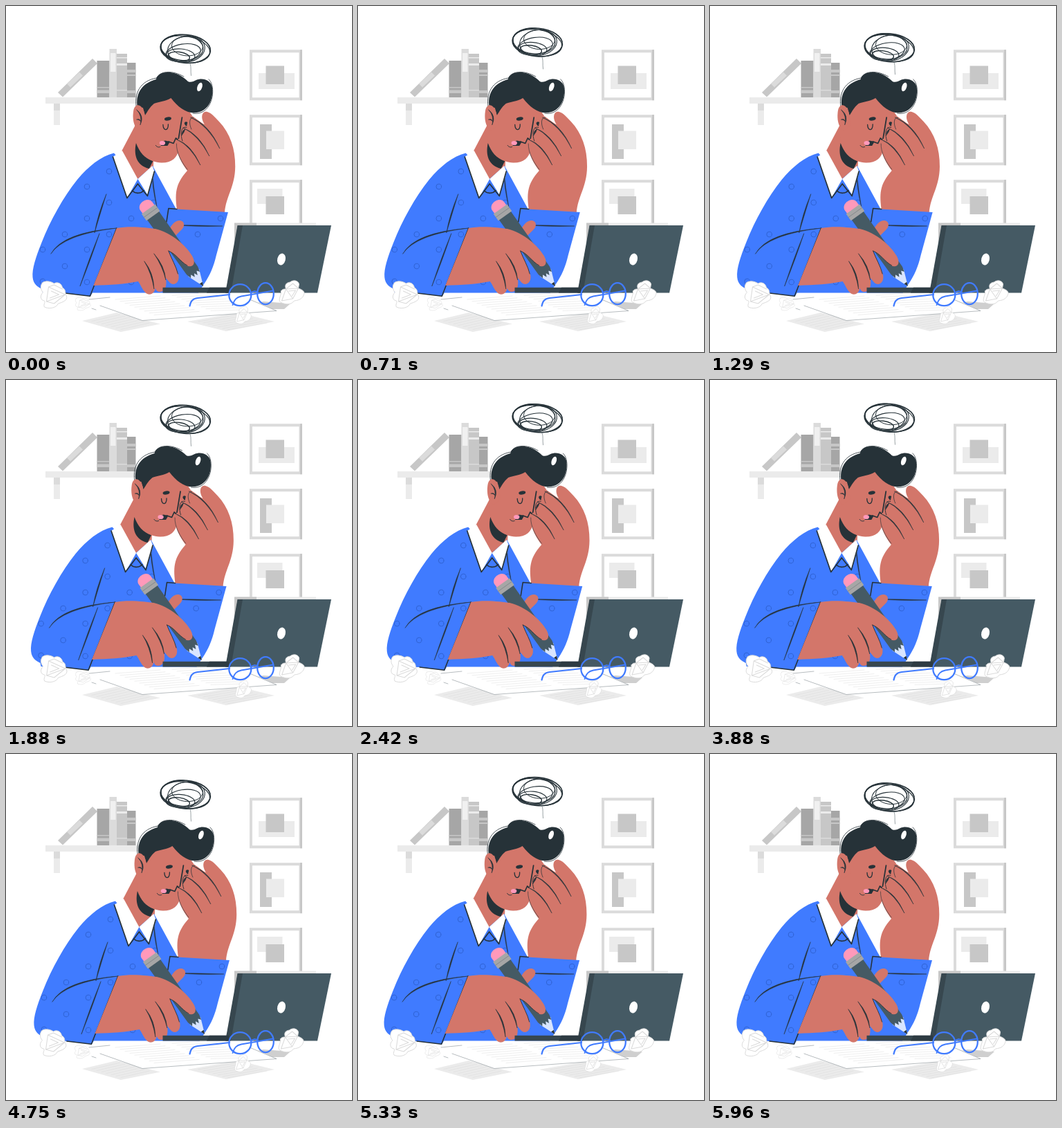
Recreate the animation shown at these times as an HTML page with a canvas. Size 500 by 500 pixels, loop 6 s.

```html
<!DOCTYPE html>
<html lang="en">
<head>
<meta charset="utf-8">
<title>Tired at the desk</title>
<style>
html, body { margin: 0; width: 100%; height: 100%; overflow: hidden; background: #fff; }
canvas { display: block; width: 100vw; height: 100vh; }
</style>
</head>
<body>
<canvas id="stage"></canvas>
<script>
const SIZE = 500, LOOP = 6000, FRAMES = 144, STEP = LOOP / FRAMES;
const INK = '#263238', BLUE = '#407bff', SKIN = '#d3766a', SLATE = '#455a64', DARK = '#37474f';
const G1 = '#ebebeb', G2 = '#dbdbdb', G3 = '#c7c7c7', G4 = '#a6a6a6';

const canvas = document.getElementById('stage');
const ctx = canvas.getContext('2d');
const ratio = window.devicePixelRatio || 1;
canvas.width = canvas.height = SIZE * ratio;

function fill(d, color) {
  ctx.fillStyle = color;
  ctx.fill(new Path2D(d));
}
function line(d, color = INK, w = 1) {
  ctx.strokeStyle = color;
  ctx.lineWidth = w;
  ctx.stroke(new Path2D(d));
}
function rect(x1, y1, x2, y2, color) {
  ctx.fillStyle = color;
  ctx.fillRect(x1, y1, x2 - x1, y2 - y1);
}
function oval(x, y, rx, ry, deg, color, w) {
  ctx.beginPath();
  ctx.ellipse(x, y, rx, ry, deg * Math.PI / 180, 0, 7);
  if (w) {
    ctx.strokeStyle = color;
    ctx.lineWidth = w;
    ctx.stroke();
  } else {
    ctx.fillStyle = color;
    ctx.fill();
  }
}
// Curved crease, thick in the middle and pointed at both ends.
function crease(x1, y1, cx, cy, x2, y2, w = 2) {
  const len = Math.hypot(x2 - x1, y2 - y1);
  const nx = (y2 - y1) / len * w, ny = (x1 - x2) / len * w;
  const d = `M${x1} ${y1}Q${cx + nx} ${cy + ny} ${x2} ${y2}Q${cx - nx} ${cy - ny} ${x1} ${y1}Z`;
  fill(d, INK);
  line(d, INK, 0.5);
}
function at(x, y, draw) {
  ctx.save();
  ctx.translate(x, y);
  draw();
  ctx.restore();
}

function drawShelf() {
  rect(57, 132, 215, 141, G1);
  rect(69, 141, 78, 172, G1);
  rect(69, 141, 78, 151, G2);
  fill('M75 125L125 76L132 83L82 131.5Z', G3);
  fill('M88 112.5L106 95.5L111 100.5L93 117.5Z', G2);
  rect(131.5, 79, 149.5, 132, G4);
  rect(131.5, 117, 149.5, 118.5, G3);
  rect(131.5, 121.5, 149.5, 126, G3);
  rect(149.5, 62, 160, 132, G2);
  rect(151, 68, 158.5, 95, '#f0f0f0');
  rect(160, 69, 175, 132, G3);
  rect(160, 74, 175, 75.5, G1);
  rect(160, 83, 175, 86, G1);
  rect(160, 121, 175, 122.5, G2);
  rect(175, 82, 187.5, 132, G4);
  rect(175, 92, 187.5, 96, G3);
  rect(175, 99, 187.5, 101, G3);
  rect(175, 122, 187.5, 126, G3);
}

function drawFrame(y) {
  rect(352, y, 428, y + 73, G2);
  rect(425, y, 428, y + 73, G3);
  rect(356, y + 4, 423.5, y + 69, '#fff');
}
function drawWall() {
  [63.3, 157.2, 251.2].forEach(drawFrame);
  rect(365, 97, 417, 120, G1);
  rect(375.5, 86.5, 402, 113, G3);
  rect(367, 171, 384, 221, G3);
  rect(376, 180.5, 402, 207, G1);
  rect(363, 264, 399.5, 286, G1);
  rect(375.5, 275, 402, 301, G3);
  rect(330, 313.5, 448, 330, G1);
  rect(330, 313.5, 362, 345, G3);
}

function drawScribble() {
  oval(259.3, 62.5, 36.2, 20.3, 5, INK, 1.7);
  oval(259, 63.2, 36, 19, 9, INK, 1.2);
  oval(254.5, 60.5, 30.5, 18.5, 5, INK, 1.2);
  oval(260.5, 63, 27, 18.5, -8, INK, 1.1);
  oval(262, 58.5, 22.5, 14, 2, INK, 1);
  oval(256, 68, 25.5, 12.5, -9, INK, 1.1);
  oval(252.5, 72, 20.5, 9.5, 5, INK, 1.2);
  oval(250, 73.5, 15.5, 6.5, 8, INK, 1.4);
  line('M235 76C246 84 264 79 266 84C268 89 266.5 94 267.5 101', '#58656b', 0.6);
}

function drawSheets() {
  fill('M110 455L160 443L223 459.5L166 471Z', G1);
  fill('M262 456L335 443L388 456L318 470Z', G1);
  for (let i = 0; i < 7; i++) {
    const x = i * 7;
    line(`M${124 + x} ${455.5 + i * 2}L${165 + x} ${446 + i * 2}`, G2, 0.5);
    line(`M${278 + x} ${456 + i * 2}L${335 + x} ${446 + i * 2}`, G2, 0.5);
  }
  fill('M345 432L372 427L411 430L402 438L370 438Z', '#cfcfcf');
  fill('M112 424L197 454.5L391 440.5L334 414L150 414Z', '#fff');
  line('M120 424L150 421M124 437L130 439M136 433L197 454.5L391 440.5L352 424', '#6f797e', 0.5);
  for (let i = 0; i < 9; i++) {
    const x = 158 + i * 7, y = 424 + i * 2.8;
    line(`M${x} ${y}L${x + 65} ${y - 5}`, '#e3e3e3', 0.6);
    line(`M${x + 82} ${y - 6}L${x + 142 - i} ${y - 10 + i * 0.3}`, '#e3e3e3', 0.6);
  }
}

const SHIRT = 'M156 212.5C137 217 119 232 103 251C83 276 64 310 51.5 342C43 363 37.5 380 38.6 392'
  + 'C39.5 402 46 406 52 409L53 414L85 415L122 419.5L125 414.5L278 414.5L286 402'
  + 'C295 389 300 377 304 360L321 298L246 293.5L212 231L190 250Z';
const DOTS = [[149, 239], [117, 261], [149, 284], [213, 284], [117, 307], [181, 307], [310, 307],
  [85, 330], [149, 330], [277, 330], [53, 352], [117, 352], [85, 376], [53, 398], [117, 399], [181, 399]];

function drawShirt() {
  fill(SHIRT, BLUE);
  ctx.save();
  ctx.clip(new Path2D(SHIRT));
  DOTS.forEach(([x, y]) => oval(x, y, 3.8, 3.8, 0, '#2f62d2', 1));
  ctx.restore();
  crease(145, 272, 134, 302, 128, 328, 1.6);
  crease(211, 236, 212, 262, 218, 290, 1);
  crease(65, 358, 83, 328.5, 160, 321, 1.6);
  crease(135, 329, 122, 364, 107, 405, 1.4);
  line('M160 321L121.5 419.3L86 415', INK, 1.6);
  line('M232 312L235 292.5L247 293.5', INK, 1.6);
  crease(243, 316.5, 280, 318, 313, 318, 1.4);
}

function drawHead() {
  fill('M187 172L167 210L190 252L213 232L214 205Z', SKIN);
  fill('M188 198C184 217 190 231 207 235L212.5 224C200 220 193 211 188 198Z', INK);
  fill('M190 145C186 160 186 180 188 194C192 214 207 226 225 226.5C240 226.5 248 219 250 206'
    + 'L270 160L250 130L212 134Z', SKIN);
  // hair
  fill('M201 158L198 147L190 146C187 128 195 112 217 106C218 98 229 95 238 96C249 97 258 104 263 109'
    + 'C267 111 271 109 275 107C284 103 296 107 298 117C300 133 294 148 280 153'
    + 'C264 158 250 148 238.5 133C230 138 222 138 214 141C207 147 205 152 201 158Z', INK);
  line('M189 150C184 126 194 108 218 104C222 94 240 92 257 102', INK, 0.8);
  line('M293 106C302 113 301 141 287 151C282 155 276 156 270 155', INK, 0.8);
  oval(280, 117, 3.4, 6.6, 20, '#fff');
  // ear
  fill('M200 154C196 141 187 140 184.5 150C182 163 185 177 193 180L203 172Z', SKIN);
  crease(189, 150, 199, 159, 194, 172, 1.5);
  crease(189, 164, 193, 163, 195, 167, 1);
  // face
  oval(234, 163, 5, 2.5, -8, INK);
  line('M227 171.5C227 181 235 181 234.5 171', INK, 1.3);
  oval(262, 171, 4.6, 2.8, 40, INK);
  line('M254.5 161L249 194L245.5 191L242 198.5L235 196', INK, 1.7);
  fill('M223 197L230 194.5L237 196L233.5 202L224 202Z', INK);
  oval(226, 198, 4.2, 3.1, 0, '#ff99ba');
  line('M216.5 201.5C218 204 221 204.5 223 203.5', INK, 1);
}

function drawCollar() {
  fill('M154.5 218L168 209L190.5 250L175 277.5Z', '#fff');
  fill('M211.5 231L215 240L205 273.5L190.5 250Z', '#fff');
  line('M154.5 218L175 277.5L190.5 257L204.5 274.5L214.5 239', INK, 1.7);
  line('M182.5 267C188 272 195 271 199.5 266.5', INK, 1.6);
}

function drawRaisedHand() {
  fill('M247.5 297C244 272 244 258 262 238C255 229 246 213 246 200C246 194 249 190 253.5 192'
    + 'C252 180 255 172 261 175C263 163 266 157 272 161C279 166 284 170 287 171'
    + 'C280 160 284 151 291 153C298 155 303 162 308 167C324 184 331.5 206 331.3 232'
    + 'C331 262 318 274 316 299Z', SKIN);
  line('M262 236C254 226 246 212 246.5 199', INK, 0.6);
  crease(247, 193, 267, 201, 281, 230, 1.2);
  crease(256, 176, 279, 186, 294, 217, 1.2);
  crease(267, 161, 293, 172, 309, 206, 1.2);
  line('M255 195C251 183 254 173 261 175.5', INK, 0.9);
  line('M268 178C264 170 265 160 271 161', INK, 0.7);
  crease(254, 187, 256, 181, 259, 178, 2.4);
}

function drawPencil() {
  ctx.save();
  ctx.translate(285.3, 405);
  ctx.rotate(-0.619);
  fill('M0 0L-9.5 -24L9.5 -24Z', '#d9e5ff');
  fill('M0 0L-2.4 -6L2.4 -6Z', INK);
  fill('M-10 -28L-8 -20L-5 -24L-2.5 -18L0 -23L2.5 -18L5 -24L8 -20L10 -28L10.5 -126L-10.5 -126Z', SLATE);
  fill('M-10.5 -136V-142C-10.5 -153.5 10.5 -153.5 10.5 -142V-136Z', '#ff99ba');
  rect(-12, -137, 12, -125, G4);
  line('M-12 -131H12', '#7f8588', 0.8);
  ctx.restore();
}

function drawWritingHand() {
  fill('M235 325C239 315 246 309 252 310C258 311 259 318 254 323L243 334Z', SKIN);
  drawPencil();
  fill('M160 321C182 317 205 321 216 322C240 328 260 346 269 361C276 373 269 379 261 375'
    + 'C251 368 245 358 235 354C239 365 247 378 249.5 389C251 400 243 405 237 400'
    + 'L231 393C233 405 230 413 222 413C219 413 217 411 216 408C214 417 206 419 201.5 414'
    + 'C197 410 195 403 191 398C172 402 150 403 126.5 404Z', SKIN);
  crease(200, 369, 212, 386, 214, 409, 1.6);
  crease(214, 358, 228, 376, 231, 396, 1.6);
  line('M235 354C239 365 246 376 248.5 387', INK, 0.9);
  line('M235 354C246 358 251 369 262 375', INK, 0.9);
}

function drawPerson() {
  drawHead();
  drawRaisedHand();
  drawShirt();
  drawCollar();
  drawWritingHand();
}

function drawLaptop() {
  fill('M335 317H470L450 414.5H318Z', SLATE);
  fill('M334.5 317H342L325 414.5H317Z', DARK);
  rect(226.5, 406.8, 322, 414.5, DARK);
  fill('M294 406.8H322V414.5H290Z', '#2d3b42');
  oval(398, 366, 5.8, 8.6, 14, '#fff');
}

function drawGlasses() {
  oval(338.3, 417.7, 16, 15.5, 0, BLUE, 2.3);
  oval(375, 415.7, 11.8, 15.5, 0, BLUE, 2.3);
  line('M354 415C357 411.5 361 411.5 363.5 414', BLUE, 2.2);
  line('M265.5 433.5C267 426 270 423 277 422L323 417', BLUE, 2.2);
  line('M327.5 432C330 424 333 421 340 419.5L386 411.5', BLUE, 1.8);
}

const ROUND = 'M-17 -17C-13 -21 -4 -19 0 -16C5 -19 11 -16 12 -10C18 -7 15 -2 18 2'
  + 'C20 8 13 11 6 13C3 20 -8 21 -14 18C-16 14 -12 11 -14 9C-21 8 -20 0 -16 -3C-20 -8 -20 -13 -17 -17Z';
const ROUND_FOLDS = 'M-8 -11L16 0L-11 10ZM-4 -5L7 0L-6 5M-11 10L0 13L16 0M-8 -11L0 -14L12 -8';
const PEAKED = 'M-15 -2C-13 -5 -11 -5 -8 -5C-10 -11 -8 -14 -2 -15C3 -19 10 -17 11 -12L10 -6'
  + 'C16 -4 20 -1 18 3C16 8 13 11 4 12C0 18 -8 18 -16 14C-20 10 -14 4 -15 -2Z';
const PEAKED_FOLDS = 'M-8 -5L10 -6L2 9ZM-4 -2L6 -3L1 5M-8 -5L-14 12L2 9M-8 -5L2 -13L10 -6';

function drawBall(outline, folds, x, y, sx, sy) {
  at(x, y, () => {
    ctx.scale(sx, sy);
    fill(outline, '#fff');
    line(outline, G2, 1);
    line(folds, G2, 1.1);
  });
}
function drawBalls() {
  drawBall(ROUND, ROUND_FOLDS, 69.5, 417, 1, 1);
  drawBall(ROUND, ROUND_FOLDS, 111.5, 430.5, 0.58, 0.48);
  drawBall(PEAKED, PEAKED_FOLDS, 412.5, 414, 1, 1);
  drawBall(PEAKED, PEAKED_FOLDS, 342.5, 447, 0.64, 0.74);
}

// Horizontal shake: a keyframe every tenth of the period.
const SHAKE = [0, -1, 2, -4, 4, -4, 4, -4, 2, -1, 0];
function shake(t, period) {
  if (t < 0) return 0;
  const p = t % period / period * 10, i = Math.floor(p);
  return SHAKE[i] + (SHAKE[(i + 1) % 11] - SHAKE[i]) * (p - i);
}
function float(t) {
  const p = t % 1500 / 750;
  return -10 * (p < 1 ? p : 2 - p);
}

function draw(t) {
  ctx.setTransform(ratio, 0, 0, ratio, 0, 0);
  ctx.lineCap = 'round';
  ctx.lineJoin = 'round';
  rect(0, 0, SIZE, SIZE, '#fff');
  drawShelf();
  drawWall();
  at(0, float(t), drawScribble);
  drawSheets();
  at(shake(t, 6000), 0, drawPerson);
  drawLaptop();
  drawGlasses();
  at(shake(t - 1500, 3000), 0, drawBalls);
}

// The clock advances in steps of 24 per second.
function tick() {
  const n = Math.floor((performance.now() + 5) / STEP) % FRAMES;
  draw((n + 1) * STEP);
  requestAnimationFrame(tick);
}
tick();
</script>
</body>
</html>
```
